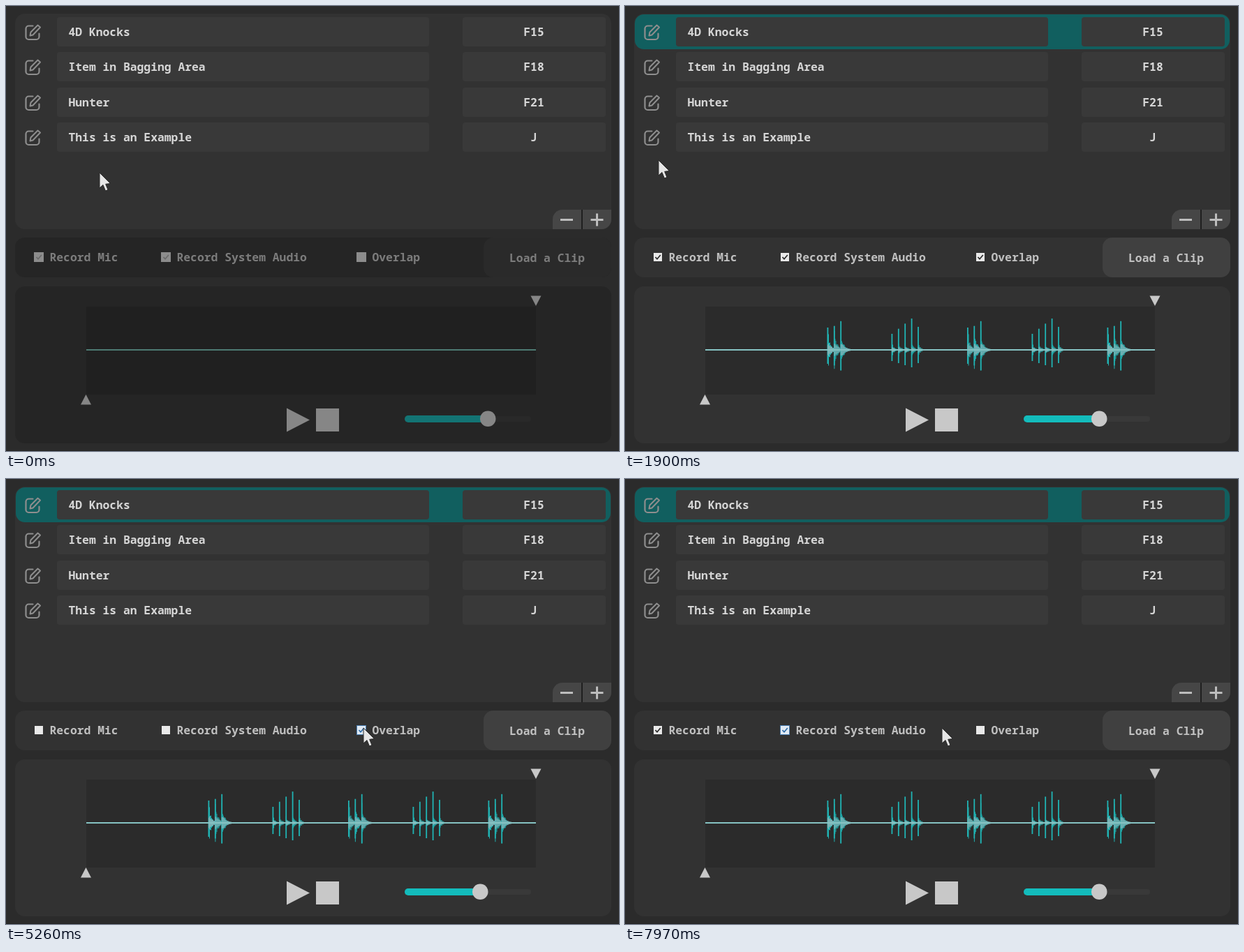
These frames come from a looping animation (878x638 px, 8000 ms). An HTML page with a canvas:

```html
<!DOCTYPE html>
<html lang="en">
<head>
<meta charset="utf-8">
<title>Soundboard</title>
<style>
html, body { margin: 0; width: 100%; height: 100%; overflow: hidden; background: #2b2b2b; }
canvas { display: block; }
</style>
</head>
<body>
<canvas id="stage" width="878" height="638"></canvas>
<script>
const ctx = document.getElementById('stage').getContext('2d');
const LOOP = 8000, RELOAD = 600, CLICK_DELAY = 100;
const CHAR = 9.81, LINE_Y = 493;

const clips = [['4D Knocks', 'F15'], ['Item in Bagging Area', 'F18'], ['Hunter', 'F21'], ['This is an Example', 'J']];
const options = [{ label: 'Record Mic', x: 41 }, { label: 'Record System Audio', x: 223 }, { label: 'Overlap', x: 503 }];

// Pointer moves; each one ends in a click after a short delay.
const home = { x: 134, y: 239 };
const moves = [
  { from: 240, to: 800, x: 34, y: 33 },
  { from: 1480, to: 1900, x: 48, y: 221 },
  { from: 1960, to: 3120, x: 108, y: 355 },
  { from: 3550, to: 4240, x: 238, y: 357 },
  { from: 4800, to: 5250, x: 512, y: 357 },
  { from: 5450, to: 6330, x: 74, y: 353 },
  { from: 6500, to: 7320, x: 283, y: 353 },
  { from: 7500, to: 7970, x: 454, y: 357 }
];
const hideAt = moves[0].to + CLICK_DELAY, showAt = hideAt + RELOAD;

const themes = {
  on: { panel: '#323232', button: '#404040', text: '#c0c0c0', box: '#e9e9e9', tick: '#2b2b2b', plot: '#2b2b2b',
        line: '#86c3c3', shape: '#c8c8c8', track: '#393939', fill: '#13bcbc', knob: 679 },
  off: { panel: '#252525', button: '#2a2a2a', text: '#7c7c7c', box: '#8c8c8c', tick: '#6a6a6a', plot: '#202020',
         line: '#4d7a72', shape: '#868686', track: '#292929', fill: '#137474', knob: 690 }
};

function box(color, x, y, w, h, r = 0) {
  ctx.fillStyle = color;
  ctx.beginPath();
  ctx.roundRect(x, y, w, h, r);
  ctx.fill();
}

function poly(color, ...points) {
  ctx.fillStyle = color;
  ctx.beginPath();
  points.forEach(p => ctx.lineTo(...p));
  ctx.closePath();
  ctx.fill();
}

function stroke(color, width, ...points) {
  ctx.strokeStyle = color;
  ctx.lineWidth = width;
  ctx.beginPath();
  points.forEach(p => ctx.lineTo(...p));
  ctx.stroke();
}

// Triangle with its apex at (x, y), pointing along the given angle.
function triangle(color, x, y, length, half, angle) {
  ctx.save();
  ctx.translate(x, y);
  ctx.rotate(angle);
  poly(color, [0, 0], [-length, -half], [-length, half]);
  ctx.restore();
}

function text(str, x, y, color, align = 'left') {
  ctx.font = `600 ${CHAR / 0.6}px "Noto Sans Mono", "DejaVu Sans Mono", monospace`;
  ctx.textAlign = align;
  ctx.fillStyle = color;
  ctx.fillText(str, x, y);
}

function editIcon(y) {
  const gray = '#8e8e8e';
  ctx.save();
  ctx.translate(38.5, y);
  ctx.lineJoin = ctx.lineCap = 'round';
  ctx.strokeStyle = gray;
  ctx.lineWidth = 2.2;
  ctx.beginPath();
  ctx.moveTo(0, -9);
  ctx.arcTo(-10, -9, -10, 0, 4);
  ctx.arcTo(-10, 10.5, 0, 10.5, 4);
  ctx.arcTo(9, 10.5, 9, 0, 4);
  ctx.lineTo(9, 2);
  ctx.stroke();
  stroke(gray, 2, [-4, 5], [-3, 0], [7, -10], [10.5, -7], [0, 4], [-4, 5]);
  ctx.restore();
}

function drawList(selected) {
  box('#323232', 13, 11, 854, 309, 14);
  if (selected) box('#115f5f', 14, 12, 852, 50, 13);
  clips.forEach(([name, key], i) => {
    const y = Math.round(16 + 50.3 * i);
    box('#393939', 73, y, 533, 42, 4);
    box('#393939', 654, y, 205, 42, 4);
    editIcon(y + 21.5);
    text(name, 89.5, y + 27, '#d6d6d6');
    text(key, 756, y + 27, '#d6d6d6', 'center');
  });
  box('#1f1f1f', 823, 292, 4, 28);
  box('#464646', 783, 292, 41, 28, [14, 0, 0, 0]);
  box('#464646', 826, 292, 41, 28, [0, 0, 14, 0]);
  for (const x of [803, 846.5]) box('#bdbdbd', x - 9, 305, 18, 3);
  box('#bdbdbd', 845, 297.5, 3, 18);
}

function isOver({ label, x }, p) {
  return Math.abs(p.y - 360) < 15 && p.x > x - 11 && p.x < x + 62 + CHAR * label.length;
}

function drawOptions(c, t, enabled, pointer) {
  box(c.panel, 13, 332, 854, 57, 14);
  box(c.button, 684, 332, 183, 57, 14);
  text('Load a Clip', 775, 367, c.text, 'center');
  for (const o of options) {
    const clicks = moves.filter(m => m.to + CLICK_DELAY <= t && isOver(o, m)).length;
    const initial = enabled || o.label !== 'Overlap';
    const hover = enabled && isOver(o, pointer);
    if (!enabled || hover) box(enabled ? '#4a7fb4' : c.box, o.x - 1, 353, 14, 14);
    box(hover ? '#e0eaf4' : c.box, o.x, 354, 12, 12);
    if (initial !== (clicks % 2 === 1)) {
      stroke(hover ? '#2f6ca8' : c.tick, 1.7, [o.x + 2.5, 360], [o.x + 5, 362.8], [o.x + 9.8, 357]);
    }
    text(o.label, o.x + 21.5, 366, c.text);
  }
}

const noise = n => Math.abs(Math.sin(n * 12.9898) * 43758.5453) % 1;

function mirrored(color, x, amp) {
  box(color, x, LINE_Y - amp, 1, amp * 2);
}

// A burst is a row of sharp hits, each ringing out exponentially.
function drawBurst(x0, count, power, height) {
  for (let i = 0; i < count; i++) {
    const last = i === count - 1;
    const x = x0 + 9.4 * i, length = last ? 10 + 6 * power : 10;
    const [up, down] = height(i);
    for (let k = 0; k < length; k++) {
      const grain = 0.7 + 0.6 * noise(i * 31 + k);
      mirrored('#20b0b0', x + k, (8 + 16 * power) * Math.exp(-k / 3.5) * grain);
    }
    box('#20b4b4', x - 0.5, LINE_Y - up, 1.8, up + down);
    for (let k = 0; k < length; k++) {
      const grain = 0.8 + 0.4 * noise(i * 17 + k);
      mirrored('#7ab3b6', x + k, (4 + 5 * power) * Math.exp(-k / (4 + 3 * power)) * grain);
    }
  }
}

function drawWave() {
  const knock = i => [32 + 2.3 * i * i, 20 + 2.4 * i * i];
  const tap = i => i < 4 ? [23 + 7.3 * i, 16 + 3 * i] : [33, 19];
  for (let i = 0; i < 3; i++) drawBurst(290 + 200.5 * i, 3, 1, knock);
  for (let i = 0; i < 2; i++) drawBurst(382 + 201 * i, 5, 0, tap);
}

function drawPlayer(c, enabled) {
  box(c.panel, 13, 402, 854, 225, 14);
  box(c.plot, 115, 431, 644, 126);
  if (enabled) drawWave();
  box(c.line, 115, LINE_Y - 1, 644, 2);
  triangle(c.shape, 759, 430, 14.5, 7.5, Math.PI / 2);
  triangle(c.shape, 114.5, 557, 14.5, 7.5, -Math.PI / 2);
  triangle(c.shape, 435, 593.5, 33, 17, 0);
  box(c.shape, 444, 577, 33, 33);
  box(c.track, 571, 588, 181, 8, 4);
  box(c.fill, 571, 587, c.knob - 571, 10, 5);
  box(c.shape, c.knob - 11, 580.5, 22.5, 22.5, 11.25);
}

function pointerAt(t) {
  let { x, y } = home;
  for (const m of moves) {
    const u = Math.min(Math.max((t - m.from) / (m.to - m.from), 0), 1);
    const e = u * u * (3 - 2 * u);
    x += (m.x - x) * e;
    y += (m.y - y) * e;
  }
  return { x, y };
}

function drawPointer({ x, y }) {
  ctx.save();
  ctx.translate(Math.round(x), Math.round(y));
  poly('#e6e6e6', [0, 0], [0, 22], [5, 17.5], [8.5, 26], [12, 24.5], [8.7, 16.3], [15.5, 15.5]);
  ctx.strokeStyle = '#2a2a2a';
  ctx.lineWidth = 1;
  ctx.stroke();
  ctx.restore();
}

function draw(t) {
  const pointer = pointerAt(t), enabled = t >= showAt;
  const colors = enabled ? themes.on : themes.off;
  box('#2b2b2b', 0, 0, 878, 638);
  box('#232323', 0, 637, 878, 1);
  drawList(t >= hideAt);
  if (t < hideAt || enabled) {
    drawOptions(colors, t, enabled, pointer);
    drawPlayer(colors, enabled);
  }
  drawPointer(pointer);
}

const begin = performance.now();
function tick() {
  draw((performance.now() - begin) % LOOP);
  requestAnimationFrame(tick);
}
tick();
</script>
</body>
</html>
```
